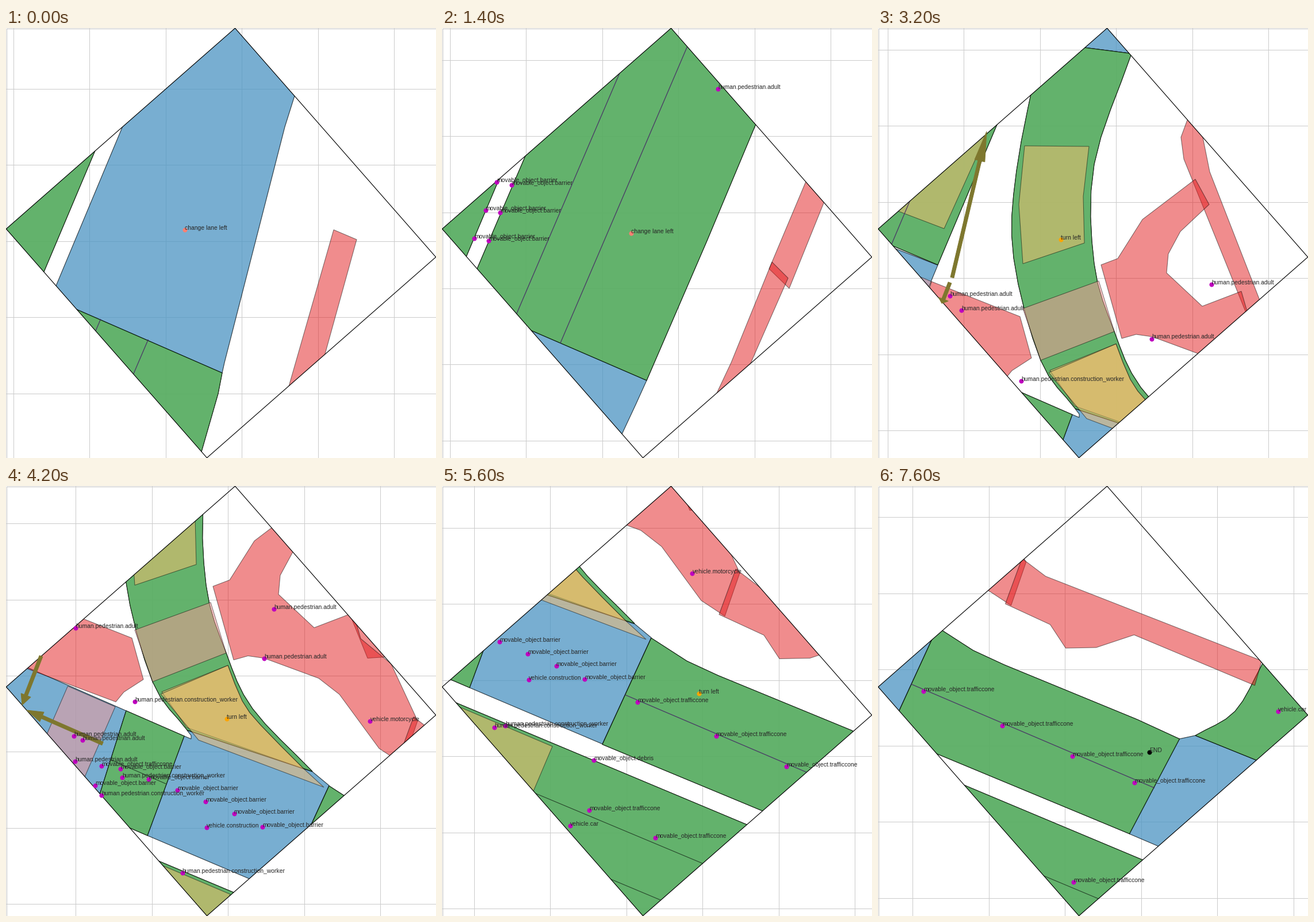
Write a matplotlib script that moves like this. It is 748x748 px and loops after 7800 ms.

```python
import numpy as np
import matplotlib.pyplot as plt
from matplotlib.animation import FuncAnimation
from matplotlib.patches import Arrow, Polygon
from matplotlib.path import Path
from matplotlib.transforms import Affine2D

SIZE, DPI, FRAMES = 748, 88, 39
PX = 72 / DPI
GRID = 132.45

# Camera stops: frame index, map shift, ego position on screen
STOPS = np.array([0, 7, 16, 21, 28, 34, 38])
CAM = np.array([(0, 0), (266, -712.3), (401.5, -1392.5), (373.5, -1630),
                (175.5, -1887.2), (-0.5, -1881.7), (-85, -1905.7)])
EGO = np.array([(311, 351), (329, 356.5), (318, 367.5), (384, 405),
                (447.5, 361.5), (436, 445.5), (472, 463.5)]) - CAM
PHASES = [(0, "change lane left", "salmon"), (12, "turn left", "orange"),
          (31, "drive straight", "darkblue"), (38, "END", "black")]

LAYERS = {"area": "#a6cee3", "segment": "#1f78b4", "block": "#b2df8a",
          "lane": "#33a02c", "crossing": "#fb9a99", "walkway": "#e31a1c",
          "stop": "#fdbf6f"}
ORDER = list(LAYERS)
BLUE = ORDER[:2]
GREEN = ORDER[:4]

plt.rcParams["font.family"] = "Liberation Sans"
fig = plt.figure(figsize=(SIZE / DPI, SIZE / DPI), dpi=DPI, facecolor="white")
ax = fig.add_axes([0, 0, 1, 1])
ax.set_xlim(0, SIZE)
ax.set_ylim(SIZE, 0)
ax.axis("off")

CORNERS = np.array([(398.5, 0.3), (747.7, 398.5), (349.5, 747.7), (0.3, 349.5)])
FRAME = Path(np.vstack([CORNERS, CORNERS[:1]]))
shift = Affine2D()
world = shift + ax.transData


# Geometry

def at(stop, *pts):
    """Map coordinates of points seen on screen at a camera stop."""
    return np.array(pts, float) - CAM[stop]


def hermite(times, pts, t):
    """Smooth cubic path through timed key points."""
    t = np.atleast_1d(t)
    slope = np.gradient(pts, times, axis=0)
    i = np.clip(np.searchsorted(times, t, "right") - 1, 0, len(times) - 2)
    h = (times[i + 1] - times[i])[:, None]
    s = (t - times[i])[:, None] / h
    return ((1 + 2 * s) * (1 - s) ** 2 * pts[i] + s * (1 - s) ** 2 * h * slope[i]
            + s * s * (3 - 2 * s) * pts[i + 1] + s * s * (s - 1) * h * slope[i + 1])


def smooth(pts, steps=4):
    n = len(pts)
    return hermite(np.arange(n), pts, np.linspace(0, n - 1, (n - 1) * steps + 1))


def beside(line, width):
    """Parallel of a two-point line, to the right of its heading on screen."""
    dx, dy = line[1] - line[0]
    return line + width * np.array((-dy, dx)) / np.hypot(dx, dy)


def band(line, width):
    return np.vstack([line, beside(line, width)[::-1]])


# Map drawing

def area(pts, *layers):
    for name in layers:
        patch = Polygon(pts, closed=True, fc=LAYERS[name], ec="black", alpha=0.5,
                        lw=1.04 * PX, transform=world, zorder=1 + ORDER.index(name))
        ax.add_patch(patch)
        patch.set_clip_path(FRAME, ax.transData)


def stroke(pts, color="black", alpha=0.65, width=1.04):
    line, = ax.plot(*pts.T, color=color, alpha=alpha, lw=width * PX,
                    transform=world, zorder=9)
    line.set_clip_path(FRAME, ax.transData)


def divider(pts):
    stroke(pts)
    stroke(pts, "#6a3d9a", 0.5, 1.5)


# First road: three lanes between two junctions, and the lanes across the median
left = np.vstack([at(0, (78, 470)), at(1, (37, 475))])
right = np.vstack([at(0, (376, 600), (369, 636), (340, 737)),
                   at(1, (546, 167), (461, 370), (356, 613))])
area(np.vstack([left[::-1], right]), *GREEN)
for width in (-94, -184):
    divider(beside(left, width))

median = at(0, (303, -137), (-326, 1352))
area(band(median, 330), *GREEN)
stroke(beside(median, 166))

area(at(0, (78, 470), (203, 171), (290, -40), (540, -40), (502, 118), (485, 172),
        (380, 582), (376, 600)), *BLUE)
area(at(1, (37, 475), (356, 613), (337, 655), (304.5, 724.5), (149.5, 705),
        (118, 760), (-54, 682)), *BLUE)

# Straight lanes after the fork
through = at(2, (245, 78), (104, 412))
area(band(through, 175), *GREEN)
divider(beside(through, 88))
area(at(2, (115, 349), (-40, 290), (40, 105), (222, 112)), "stop")
area(band(at(2, (93, 441), (-25, 392)), -40), "crossing")

# Turning lane
inner = smooth(at(2, (285, 24.5), (241, 248), (236, 400), (283, 578), (343, 662)))
outer = smooth(at(2, (441, 44.5), (376, 237), (376, 410), (411, 528), (457, 625),
                  (561, 734)))
area(np.vstack([inner, outer[::-1]]), *GREEN)
area(at(2, (255, 205), (367, 206), (357, 293), (359, 374), (252, 410),
        (245, 307)), "stop")
area(at(2, (252, 488), (384, 440), (411, 528), (283, 578)), "crossing")
curve = smooth(at(3, (386, 312), (411, 374), (443, 416), (518, 492)), 2)
area(np.vstack([curve, at(3, (314, 420), (271, 358))]), "stop")
area(np.vstack([curve, at(3, (553, 524), (335, 442), (269, 362))]), "stop")

# Crossroad
area(at(3, (76, 175), (61, 211), (38, 262), (38, 316), (209, 391), (153, 568),
        (-100, 460), (-130, 95)), *BLUE)
area(band(at(3, (190, 384), (120, 545)), 90), "crossing")
area(at(3, (209, 391), (310, 435), (246, 608), (153, 568)), *GREEN)
stroke(at(3, (182, 476), (278, 518)))
area(at(3, (310, 435), (322, 440), (322, 434), (315, 425), (533, 497), (562, 521),
        (477, 706), (246, 608)), *BLUE)
area(at(5, (188, 270), (250, 310), (304, 335), (535, 430), (609, 464), (522, 629),
        (103, 455)), *GREEN)
divider(at(5, (143, 369), (565, 549)))
area(at(6, (524, 440), (552, 434), (745, 512), (660, 700), (437, 605)), *BLUE)
bend = smooth(at(6, (552, 434), (621, 392), (669, 309)))
area(np.vstack([bend, at(6, (900, 300), (745, 512))]), *GREEN)

# Opposite carriageway
opposite = at(4, (-200, 283), (900, 744))
area(band(opposite, 350), *GREEN)
for width in (92, 179):
    stroke(beside(opposite, width))
area(band(at(4, (192, 453), (-20, 363)), -180), "stop")

# Walkways
area(np.vstack([
    at(0, (492, 623), (570, 351), (610, 368), (555, 567)),
    at(1, (665, 302), (604, 453), (569, 419), (633, 267))]), "walkway")
area(np.vstack([
    at(1, (478, 635), (503, 582), (574, 407), (602, 435), (537, 583)),
    at(2, (565, 190), (577, 250), (688, 535), (657, 537), (532, 228),
       (527, 190))]), "walkway")
area(at(2, (388, 412), (417, 401), (460, 333), (552, 263), (576, 307), (526, 354),
        (505, 393), (502, 426), (564, 484), (632, 458), (645, 503), (698, 547),
        (744, 646), (718, 721), (677, 694), (608, 600), (572, 572), (477, 537),
        (449, 533), (424, 540)), "walkway")
area(at(2, (93, 441), (247, 502), (267, 574), (233, 596), (219, 613), (64, 555)),
     "walkway")
area(at(5, (335, 150), (376, 181), (752, 328), (740, 371), (530, 283), (464, 305),
        (411, 306), (384, 265), (306, 229)), "walkway")

# Road users
THINGS = []
ADULT, WORKER = "human.pedestrian.adult", "human.pedestrian.construction_worker"
CONE, BARRIER = "movable_object.trafficcone", "movable_object.barrier"


def note(label):
    return ax.text(0, 0, label, fontsize=10.4 * PX, color="0.15", zorder=13)


def add(label, stop, x, y, drift=(0, 0)):
    """Label a road user seen at a stop; drift is its speed per frame."""
    dot, = ax.plot([0], [0], "o", color="m", ms=8 * PX, mew=0, zorder=11)
    THINGS.append((STOPS[stop], at(stop, (x, y))[0], np.array(drift), dot, note(label)))


def row(label, stop, count, start, step, bend=(0, 0)):
    for k in range(count):
        add(label, stop, *(np.array(start) + k * np.array(step) + k * k * np.array(bend)))


row(BARRIER, 1, 3, (95.5, 268), (-19.8, 49))
row(BARRIER, 1, 3, (121.5, 272.5), (-20.2, 48.8))
row(BARRIER, 3, 6, (199, 492), (49.4, 17), (0, 0.65))
row(CONE, 4, 4, (340, 376), (144, 62.5), (-7.3, -3.2))
row(CONE, 4, 4, (256, 564), (115, 48))
row(ADULT, 3, 2, (118, 435), (15, 6.5))
add(BARRIER, 3, 155, 520.5)
add(CONE, 3, 166.5, 487)
add(ADULT, 1, 480.5, 106)
add(ADULT, 2, 125, 465.5)
add(ADULT, 2, 145.5, 491, (0.8, -1.4))
add(ADULT, 2, 580, 446, (-17.2, 1))
add(ADULT, 2, 476, 540.5, (0.2, -0.7))
add(ADULT, 3, 120, 479)
add(WORKER, 2, 249.5, 613.5, (0.5, -0.2))
add(WORKER, 3, 202.5, 506.5)
add(WORKER, 3, 166, 537.5)
add(WORKER, 4, 110, 417, (0.2, 0.2))
add(WORKER, 4, 91, 420, (2, -1.5))
add("vehicle.construction", 4, 151, 337)
add("vehicle.motorcycle", 4, 435.5, 151.5)
add("movable_object.debris", 4, 264.5, 477)
add("vehicle.car", 4, 223, 591)
add("vehicle.car", 6, 696, 392.5)

# Traffic lights
LIGHTS = []
for stop, tail, tip in [(2, (129, 434), (189, 180)), (2, (125, 443), (111, 479)),
                        (3, (61, 296), (28, 381)), (3, (168, 448), (36, 390))]:
    start, end = at(stop, tail, tip)
    arrow = Arrow(*start, *(end - start), width=30, color="#7e772e", lw=1.04 * PX,
                  transform=world, zorder=10)
    ax.add_patch(arrow)
    LIGHTS.append((start, arrow))

# Grid, border and ego
def grid_line(xs, ys, width=1.04):
    return ax.plot(xs, ys, color="0.8", lw=width * PX, zorder=0)[0]


v_lines = [grid_line([0, 0], [0, SIZE]) for _ in range(7)]
h_lines = [grid_line([0, SIZE], [0, 0]) for _ in range(7)]
grid_line([0.5, 0.5, SIZE], [SIZE, 0.5, 0.5], 1.3)
ax.add_patch(Polygon(CORNERS, closed=True, fill=False, ec="black",
                     lw=1.15 * PX, zorder=9.5))
ego_dot, = ax.plot([0], [0], "o", ms=8 * PX, mew=0, zorder=12)
ego_note = note("")


def inside(p):
    edge = np.roll(CORNERS, -1, axis=0) - CORNERS
    rel = p - CORNERS
    dist = (edge[:, 0] * rel[:, 1] - edge[:, 1] * rel[:, 0]) / np.hypot(*edge.T)
    return dist.min() > -0.5


def place(dot, text, p):
    dot.set_data([p[0]], [p[1]])
    text.set_position(p)


def draw(n):
    cam = hermite(STOPS, CAM, n)[0]
    shift.clear().translate(*cam)
    x0, y0 = (np.array((12.9, 105.7)) + cam) % GRID - GRID
    for i, (v, h) in enumerate(zip(v_lines, h_lines)):
        v.set_xdata([x0 + i * GRID] * 2)
        h.set_ydata([y0 + i * GRID] * 2)
    for when, spot, drift, dot, text in THINGS:
        p = cam + spot + drift * (n - when)
        seen = inside(p)
        dot.set_visible(seen)
        text.set_visible(seen)
        place(dot, text, p)
    for start, arrow in LIGHTS:
        arrow.set_visible(inside(start + cam))
    _, label, color = [p for p in PHASES if p[0] <= n][-1]
    ego_dot.set_color(color)
    ego_note.set_text(label)
    place(ego_dot, ego_note, hermite(STOPS, EGO, n)[0] + cam)
    return []


anim = FuncAnimation(fig, draw, frames=FRAMES, interval=200, repeat=True,
                     repeat_delay=0, init_func=lambda: draw(0))
plt.show()
```
